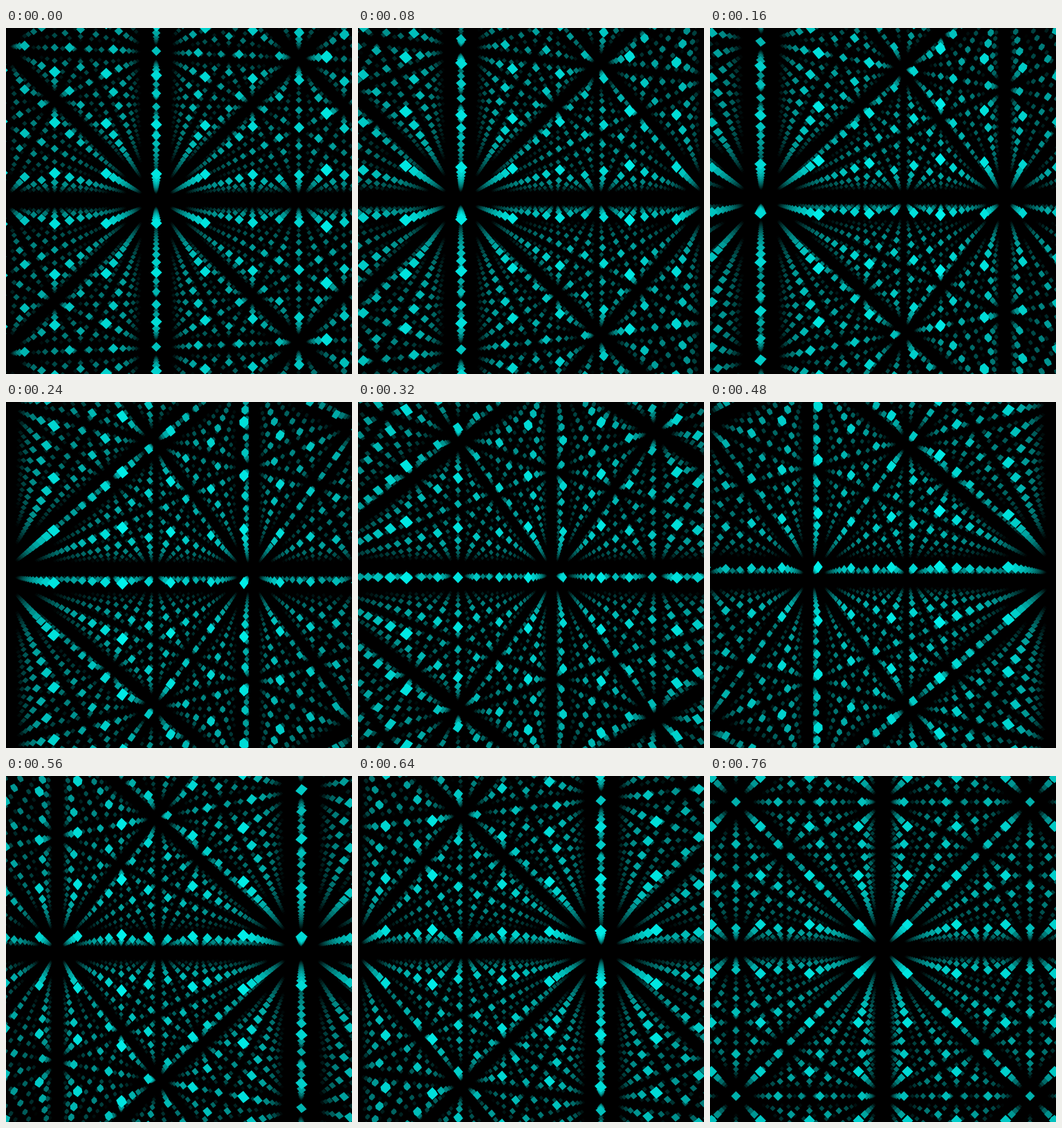
Animation of 500 by 500 pixels, one loop 800 ms. Source, as an HTML page with a canvas:

```html
<!DOCTYPE html>
<html>
<head>
<meta charset="utf-8">
<style>
html, body { margin: 0; width: 100%; height: 100%; overflow: hidden; background: #000; }
canvas { display: block; width: 500px; height: 500px; }
</style>
</head>
<body>
<canvas id="stage" width="500" height="500"></canvas>
<script>
const ctx = document.getElementById('stage').getContext('2d');
const LOOP = 800, STEPS = 20;
const MID = 250, FOCAL = 425;
const PIVOT = 6.5;           // camera to rotation axis, in cells
const NEAR = 5.2, FAR = 20;  // visible depth
const R = 0.115;             // octahedron radius
const SPAN = 18;

// Convex hull of a few projected points
function hull(pts) {
  pts.sort((a, b) => a[0] - b[0] || a[1] - b[1]);
  const half = list => {
    const out = [];
    for (const p of list) {
      while (out.length > 1) {
        const a = out[out.length - 2], b = out[out.length - 1];
        if ((b[0] - a[0]) * (p[1] - a[1]) - (b[1] - a[1]) * (p[0] - a[0]) > 0) break;
        out.pop();
      }
      out.push(p);
    }
    out.pop();
    return out;
  };
  const lower = half(pts);
  return lower.concat(half(pts.reverse()));
}

const project = (x, y, z) => [MID + FOCAL * x / z, MID + FOCAL * y / z];

function columns(cos, sin) {
  const list = [];
  for (let i = -SPAN; i < SPAN; i++) {
    for (let k = -SPAN; k < SPAN; k++) {
      const x = (i + 0.5) * cos - (k + 0.5) * sin;
      const z = (i + 0.5) * sin + (k + 0.5) * cos + PIVOT;
      if (z > NEAR && z < FAR && Math.abs(x) < 0.6 * z + 0.2) list.push([x, z]);
    }
  }
  return list.sort((a, b) => b[1] - a[1]);
}

function octahedron(x, y, z, c, s) {
  const dist = Math.hypot(x, y, z);
  if (dist >= FAR) return;
  const light = Math.min(1, ((FAR - dist) / (FAR - 5.5)) ** 1.3);
  const shape = hull([
    project(x, y - R, z), project(x, y + R, z),
    project(x + c, y, z + s), project(x - c, y, z - s),
    project(x - s, y, z + c), project(x + s, y, z - c)
  ]);
  ctx.fillStyle = `rgb(0,${Math.round(240 * light)},${Math.round(235 * light)})`;
  ctx.beginPath();
  for (const [px, py] of shape) ctx.lineTo(px, py);
  ctx.fill();
}

function draw(step) {
  const turn = (step + 1) / STEPS;
  const angle = turn * Math.PI / 2;
  const cos = Math.cos(angle), sin = Math.sin(angle);
  ctx.fillStyle = '#000';
  ctx.fillRect(0, 0, 500, 500);
  for (const [x, z] of columns(cos, sin)) {
    const rows = Math.ceil(0.6 * z) + 1;
    for (let j = -rows; j <= rows; j++) {
      const y = j + 0.5 - turn;
      if (Math.abs(y) < 0.6 * z + 0.2) octahedron(x, y, z, R * cos, R * sin);
    }
  }
}

let shown = -1;
function tick() {
  const step = Math.floor(performance.now() % LOOP / LOOP * STEPS);
  if (step !== shown) draw(shown = step);
  requestAnimationFrame(tick);
}
tick();
</script>
</body>
</html>
```
